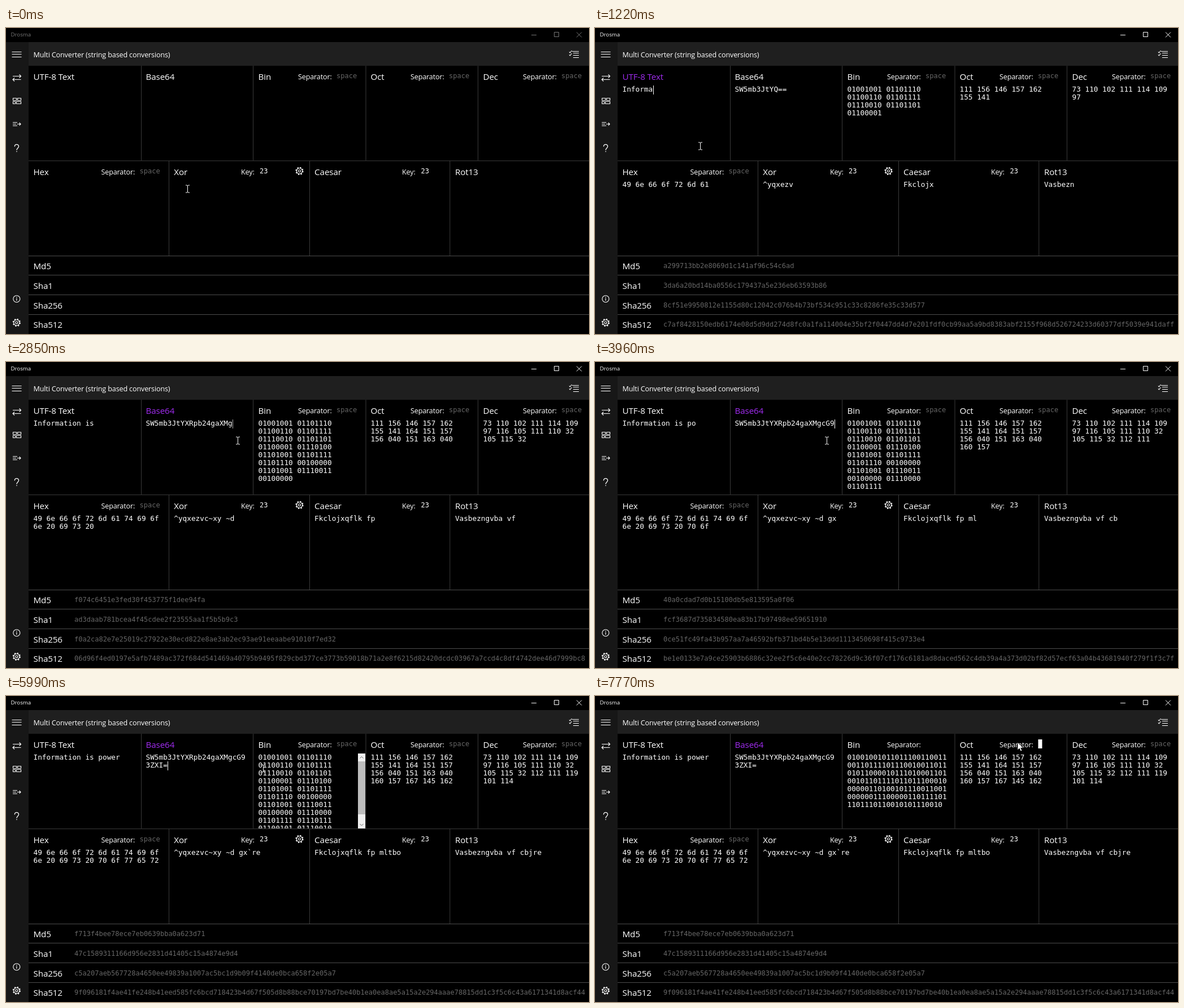
Recreate the animation shown at these times as an HTML page. Size 1032 px wide and 543 px high, loop 8000 ms.

```html
<!DOCTYPE html>
<html lang="en">
<head>
<meta charset="utf-8">
<title>Multi Converter</title>
<style>
  html, body { margin: 0; width: 100%; height: 100%; overflow: hidden; background: #000; }
  svg { display: block; width: 1032px; height: 543px; }
  text { white-space: pre; fill: #fff; }
  .ui { font: 12.6px "Open Sans", "Noto Sans", sans-serif; letter-spacing: -.15px; }
  .label { font: 15.2px "Open Sans", "Noto Sans", sans-serif; letter-spacing: -.12px; }
  .mono { font: 12.72px "DejaVu Sans Mono", monospace; }
  .small { font: 12.02px "DejaVu Sans Mono", monospace; }
  .dim { fill: #666; }
  .icon { fill: none; stroke: #fff; stroke-width: 1.1; }
</style>
</head>
<body>
<svg viewBox="0 0 1032 543">
  <clipPath id="top"><rect x="40" y="67" width="992" height="168"/></clipPath>
  <clipPath id="wide"><rect x="121" y="405" width="904" height="138"/></clipPath>

  <rect y="25" width="40" height="518" fill="#171717"/>
  <rect x="40" y="25" width="992" height="42" fill="#1f1f1f"/>
  <g id="chrome">
    <text x="8.5" y="15" style="font:9.7px 'Open Sans','Noto Sans',sans-serif;fill:currentColor">Drosma</text>
    <path d="M930 12.5h9M970.5 7.5h8v8h-8zM1010 7.5l9 9M1019 7.5l-9 9" fill="none" stroke="currentColor"/>
  </g>
  <text class="ui" x="48.5" y="52">Multi Converter (string based conversions)</text>

  <g class="icon">
    <path d="M10.5 42.5h17m-17 4h17m-17 5h17"/>
    <path d="M12 85.5h14.5m-3-3l3 3-3 3M26.5 91.5H12m3-3l-3 3 3 3"/>
    <path d="M12.5 124.5h6v4h-6zm8 0h6v4h-6zm-8 6h4v4h-4zm6 0h8v4h-8z"/>
    <path d="M12 167.5h8m-8 3h6m-6 3h8m-.5-3h6.5m-2.5-2.5l2.5 2.5-2.5 2.5"/>
    <path d="M15.3 210.5c0-5 7.2-5 7.2-.5 0 3.2-3.6 3.3-3.6 6.7m0 1.7v1.6" stroke-width="1.3"/>
    <circle cx="18.8" cy="480.7" r="6"/>
    <path d="M18.8 479.5v4.5m0-7v1.4"/>
    <path d="M1002 41.5h12m-10 3h10m-10 4h10m-10 4h10M997 42.5l1.5 1.5 3-4m-4.5 7.5l1.5 1.5 3-4"/>
    <g id="gears"></g>
  </g>

  <path d="M239.5 67v168M437.5 67v168M637 67v168M835.5 67v168M40 235.7h992M288.5 236v168M537.5 236v168M785.8 236v168" stroke="#3a3a3a" fill="none"/>
  <path d="M40 404.5h992M40 438.5h992M40 473.5h992M40 508.5h992" stroke="#4c4c4c"/>

  <g id="labels"></g>
  <g id="values" clip-path="url(#top)"></g>
  <g id="lower"></g>
  <g id="hashes" clip-path="url(#wide)"></g>

  <g id="scrollbar">
    <rect x="623" y="102" width="13" height="133" fill="#f0f0f0"/>
    <rect x="623" y="116" width="13" height="94" fill="#bdbdbd"/>
    <path d="M626.5 110.5l3-3 3 3M626.5 227l3 3 3-3" fill="none" stroke="#666"/>
  </g>
  <rect id="block" y="77" width="7" height="16" fill="#fff"/>
  <rect id="caret" width="1" height="16" fill="#fff"/>
  <path id="beam" d="M-3.5-6.5h2.5l1 1 1-1h2.5M0-6V6M-3.5 6.5h2.5l1-1 1 1h2.5" fill="none" stroke="#fff"/>
  <path id="arrow" d="M0 0v14l3.3-3 2.2 5 2.4-1-2.2-4.8h4.3z" fill="#fff" stroke="#000" stroke-width=".7"/>
</svg>
<script>
const LOOP = 8000, TICK = 60, ADVANCE = 12.72 * 0.602, LINE = 14;
const $ = id => document.getElementById(id);

function add(parent, tag, attrs, content = '') {
  const el = document.createElementNS('http://www.w3.org/2000/svg', tag);
  for (const name in attrs) el.setAttribute(name, attrs[name]);
  el.textContent = content;
  return $(parent).appendChild(el);
}
const text = (parent, cls, x, y, content) => add(parent, 'text', { class: cls, x, y }, content);

// ---------- hashes (messages always fit one block) ----------
const codesOf = s => [...s].map(c => c.codePointAt(0));
const hex = (n, len) => n.toString(16).padStart(len, '0');
const swap = s => s.match(/../g).reverse().join('');
const rol = (x, n) => (x << n) | (x >>> (32 - n));
const INIT = [0x67452301, 0xefcdab89, 0x98badcfe, 0x10325476, 0xc3d2e1f0];
const block = (msg, digits) =>
  (msg + '80').padEnd(digits - 8, '0') + hex(msg.length * 4, 8);

function md5(msg) {
  const bytes = (msg + '80').padEnd(112, '0') + hex(msg.length * 4, 2).padEnd(16, '0');
  const m = bytes.match(/.{8}/g).map(w => parseInt(swap(w), 16));
  const shifts = [[7, 12, 17, 22], [5, 9, 14, 20], [4, 11, 16, 23], [6, 10, 15, 21]];
  let [a, b, c, d] = INIT;
  for (let i = 0; i < 64; i++) {
    const r = i >> 4;
    const f = [(b & c) | (~b & d), (d & b) | (~d & c), b ^ c ^ d, c ^ (b | ~d)][r];
    const g = [i, 5 * i + 1, 3 * i + 5, 7 * i][r] % 16;
    const k = Math.floor(Math.abs(Math.sin(i + 1)) * 2 ** 32);
    const sum = (a + f + k + m[g]) | 0;
    [a, d, c, b] = [d, c, b, (b + rol(sum, shifts[r][i % 4])) | 0];
  }
  return [a, b, c, d].map((v, i) => swap(hex((v + INIT[i]) >>> 0, 8))).join('');
}

function sha1(msg) {
  const w = block(msg, 128).match(/.{8}/g).map(s => parseInt(s, 16));
  const k = [2, 3, 5, 10].map(n => Math.floor(Math.sqrt(n) * 2 ** 30));
  let [a, b, c, d, e] = INIT;
  for (let i = 0; i < 80; i++) {
    if (i > 15) w[i] = rol(w[i - 3] ^ w[i - 8] ^ w[i - 14] ^ w[i - 16], 1);
    const r = Math.floor(i / 20);
    const f = [(b & c) | (~b & d), b ^ c ^ d, (b & c) | (b & d) | (c & d), b ^ c ^ d][r];
    const sum = (rol(a, 5) + f + e + k[r] + w[i]) | 0;
    [e, d, c, b, a] = [d, c, rol(b, 30), a, sum];
  }
  return [a, b, c, d, e].map((v, i) => hex((v + INIT[i]) >>> 0, 8)).join('');
}

const primes = [];
for (let n = 2; primes.length < 80; n++) if (primes.every(p => n % p)) primes.push(n);

// 64 fractional bits of the n-th root of p, by Newton's method
function rootBits(p, n) {
  const v = BigInt(p) << (64n * n);
  let x = 1n << 70n;
  for (;;) {
    const y = ((n - 1n) * x + v / x ** (n - 1n)) / n;
    if (y >= x) return x & ((1n << 64n) - 1n);
    x = y;
  }
}
const cubeBits = primes.map(p => rootBits(p, 3n));
const squareBits = primes.slice(0, 8).map(p => rootBits(p, 2n));

function sha2(msg, size) {
  const bits = BigInt(size), mask = (1n << bits) - 1n, cut = 64n - bits;
  const [rounds, s] = size === 64
    ? [80, [28n, 34n, 39n, 14n, 18n, 41n, 1n, 8n, 7n, 19n, 61n, 6n]]
    : [64, [2n, 13n, 22n, 6n, 11n, 25n, 7n, 18n, 3n, 17n, 19n, 10n]];
  const rot = (x, n) => ((x >> n) | (x << (bits - n))) & mask;
  const big = (x, i) => rot(x, s[i]) ^ rot(x, s[i + 1]) ^ rot(x, s[i + 2]);
  const little = (x, i) => rot(x, s[i]) ^ rot(x, s[i + 1]) ^ (x >> s[i + 2]);
  const digits = size / 4;
  const w = block(msg, size * 4).match(new RegExp(`.{${digits}}`, 'g')).map(v => BigInt('0x' + v));
  const start = squareBits.map(v => v >> cut);
  let [a, b, c, d, e, f, g, h] = start;
  for (let i = 0; i < rounds; i++) {
    if (i > 15) w[i] = (w[i - 16] + little(w[i - 15], 6) + w[i - 7] + little(w[i - 2], 9)) & mask;
    const t1 = h + big(e, 3) + ((e & f) ^ (~e & g)) + (cubeBits[i] >> cut) + w[i];
    const t2 = big(a, 0) + ((a & b) ^ (a & c) ^ (b & c));
    [h, g, f, e, d, c, b, a] = [g, f, e, (d + t1) & mask, c, b, a, (t1 + t2) & mask];
  }
  return [a, b, c, d, e, f, g, h].map((v, i) => hex((v + start[i]) & mask, digits)).join('');
}

// ---------- text conversions ----------
const LOWER = 'abcdefghijklmnopqrstuvwxyz', UPPER = LOWER.toUpperCase();
const SIXTY_FOUR = UPPER + LOWER + '0123456789+/';

function encode(s) {
  const bits = codesOf(s).map(c => c.toString(2).padStart(8, '0')).join('');
  const letters = (bits.match(/.{1,6}/g) || []).map(b => SIXTY_FOUR[parseInt(b.padEnd(6, '0'), 2)]);
  return letters.join('').padEnd(Math.ceil(letters.length / 4) * 4, '=');
}
const rotate = (s, n) => s.replace(/[a-z]/gi, c => {
  const letters = LOWER.includes(c) ? LOWER : UPPER;
  return letters[(letters.indexOf(c) + n) % 26];
});
const xor = s => s.replace(/\S/g, c => String.fromCodePoint(c.codePointAt(0) ^ 23));

const chunk = s => s.match(/.{1,23}/g) || [];
function wrap(words, columns) {
  const rows = [];
  for (const word of words) {
    const last = rows.length - 1;
    if (last >= 0 && rows[last].length + word.length + 2 <= columns) rows[last] += ' ' + word;
    else rows.push(word);
  }
  return rows;
}

// ---------- layout ----------
for (const [x, y] of [[18.8, 522.8], [519.5, 253.8]]) {
  add('gears', 'circle', { cx: x, cy: y, r: 5 });
  add('gears', 'circle', { cx: x, cy: y, r: 2 });
  add('gears', 'circle', { cx: x, cy: y, r: 6.2, 'stroke-width': 1.7, 'stroke-dasharray': 6.2 * Math.PI / 8 });
}

const topX = i => 48.5 + 199 * i, lowX = i => 48.5 + 248.8 * i;
const topLabels = ['UTF-8 Text', 'Base64', 'Bin', 'Oct', 'Dec'].map((s, i) => text('labels', 'label', topX(i), 91.5, s));
['Hex', 'Xor', 'Caesar', 'Rot13'].forEach((s, i) => text('labels', 'label', lowX(i), 260.5, s));
const hints = [[517, 90.5], [716, 90.5], [915, 90.5], [168.5, 259.5]].map(([x, y]) => {
  text('labels', 'ui', x, y, 'Separator:');
  return text('labels', 'small dim', x + 68, y - 1.5, 'space');
});
for (const [x, keyX] of [[416, 449], [701, 734.5]]) {
  text('labels', 'ui', x, 259.5, 'Key:');
  text('labels', 'small', keyX, 258, '23');
}
const hashRows = ['Md5', 'Sha1', 'Sha256', 'Sha512'].map((s, i) => {
  const y = 426 + Math.round(i * 34.8);
  text('labels', 'label', 48.5, y + 2.3, s);
  return text('hashes', 'small dim', 121, y, '');
});
const topValues = [0, 1, 2, 3, 4].map(i => text('values', 'mono', topX(i), 113.3, ''));
const lowValues = [0, 1, 2, 3].map(i => text('lower', 'mono', lowX(i), 282.3, ''));

function setRows(el, rows) {
  el.textContent = '';
  rows.forEach((row, i) => {
    const span = document.createElementNS(el.namespaceURI, 'tspan');
    span.setAttribute('x', el.getAttribute('x'));
    span.setAttribute('dy', i ? LINE : 0);
    span.textContent = row;
    el.append(span);
  });
}

function showText(plain, encoded, joined) {
  const inRadix = (radix, len) => codesOf(plain).map(c => c.toString(radix).padStart(len, '0'));
  const bin = inRadix(2, 8), bytes = inRadix(16, 2);
  [[plain], chunk(encoded), joined ? chunk(bin.join('')) : wrap(bin, 23), wrap(inRadix(8, 3), 23), wrap(inRadix(10, 0), 23)]
    .forEach((rows, i) => setRows(topValues[i], rows));
  [wrap(bytes, 30), [xor(plain)], [rotate(plain, 23)], [rotate(plain, 13)]]
    .forEach((rows, i) => setRows(lowValues[i], rows));
  const msg = bytes.join('');
  const sums = plain ? [md5(msg), sha1(msg), sha2(msg, 32), sha2(msg, 64)] : [];
  hashRows.forEach((el, i) => el.textContent = sums[i] || '');
}

// ---------- timeline ----------
const PHRASE = 'Information is power';
const plainKeys = [530, 640, 750, 870, 990, 1050, 1160, 1280, 1340, 1400, 1510, 1570, 1800, 1880, 1970];
const codeKeys = [3260, 3670, 3960, 4130, 4420, 4710, 4880, 5170];
const ACTIVE = 240, TO_CODE = 2560, SCROLLBAR = 5990, BIN_CLICK = 6410, BIN_SELECT = 6530,
      BIN_CLEAR = 6820, OCT_CLICK = 7530, OCT_SELECT = 7650;
const path = [
  [0, 321, 285], [180, 186, 209], [2140, 186, 209], [2560, 410, 139], [5810, 410, 139],
  [6050, 470, 124], [6350, 600, 87], [6470, 600, 87], [6650, 575, 88], [6820, 575, 88],
  [7470, 794, 86], [7530, 794, 86], [7770, 748, 82], [LOOP, 748, 82],
];
const blinks = [2850, 5460], BLINK = 410;

const pressed = (keys, t) => keys.filter(k => k <= t).length;
const show = (id, on) => $(id).style.display = on ? '' : 'none';
const place = (id, x, y) => $(id).setAttribute('transform', `translate(${x} ${y})`);

function pointer(t) {
  const i = path.findIndex(([end]) => end > t);
  const [t0, x0, y0] = path[i - 1], [t1, x1, y1] = path[i];
  const part = Math.floor((t - t0) / TICK) * TICK / (t1 - t0);
  return [Math.round(x0 + (x1 - x0) * part), Math.round(y0 + (y1 - y0) * part)];
}

function caretAlpha(t) {
  if (t < ACTIVE || t >= BIN_CLICK) return 0;
  const off = blinks.find(b => t >= b && t < b + BLINK);
  return off ? Math.max(0, 1 - (Math.floor((t - off) / TICK) + 1) / 3) : 1;
}

// Plain text is typed first; later the code itself, which holds 6 bits a letter.
function content(t) {
  const typed = pressed(plainKeys, t), added = pressed(codeKeys, t);
  if (!added) {
    const plain = PHRASE.slice(0, typed);
    return { plain, encoded: encode(plain), invalid: false };
  }
  const length = typed * 4 / 3 + added;
  return {
    plain: PHRASE.slice(0, Math.floor(length * 3 / 4)),
    encoded: encode(PHRASE).slice(0, length),
    invalid: length % 4 === 1,
  };
}

let shown;
function render(t) {
  const { plain, encoded, invalid } = content(t);
  const inCode = t >= TO_CODE, joined = t >= BIN_CLEAR;

  const key = plain + encoded + joined;
  if (key !== shown) showText(plain, encoded, joined);
  shown = key;

  $('chrome').style.color = t < ACTIVE ? '#777' : '#fff';
  topLabels[0].style.fill = t >= ACTIVE && !inCode ? '#a02cf0' : '';
  topLabels[1].style.fill = inCode ? (invalid ? '#e81123' : '#a02cf0') : '';
  hints[0].style.display = t < BIN_CLICK ? '' : 'none';
  hints[1].style.display = t < OCT_CLICK ? '' : 'none';
  show('scrollbar', t >= SCROLLBAR && t < BIN_CLEAR);
  show('block', (t >= BIN_SELECT && t < BIN_CLEAR) || t >= OCT_SELECT);
  $('block').setAttribute('x', t < OCT_SELECT ? 585.5 : 784.5);

  const rows = inCode ? chunk(encoded) : [plain];
  const caretX = (inCode ? 248 : 49) + rows[rows.length - 1].length * ADVANCE;
  $('caret').setAttribute('x', Math.round(caretX));
  $('caret').setAttribute('y', 102 + LINE * (rows.length - 1));
  $('caret').setAttribute('opacity', caretAlpha(t));

  const [x, y] = pointer(t);
  const inField = left => x >= left && x <= left + 45;
  const beam = y > 101 || inField(583) || inField(782);
  show('beam', beam);
  show('arrow', !beam);
  place('beam', x + .5, y + .5);
  place('arrow', x, y);
}

const began = performance.now();
function frame() {
  render(Math.max(0, performance.now() - began) % LOOP);
  requestAnimationFrame(frame);
}
frame();
</script>
</body>
</html>
```
